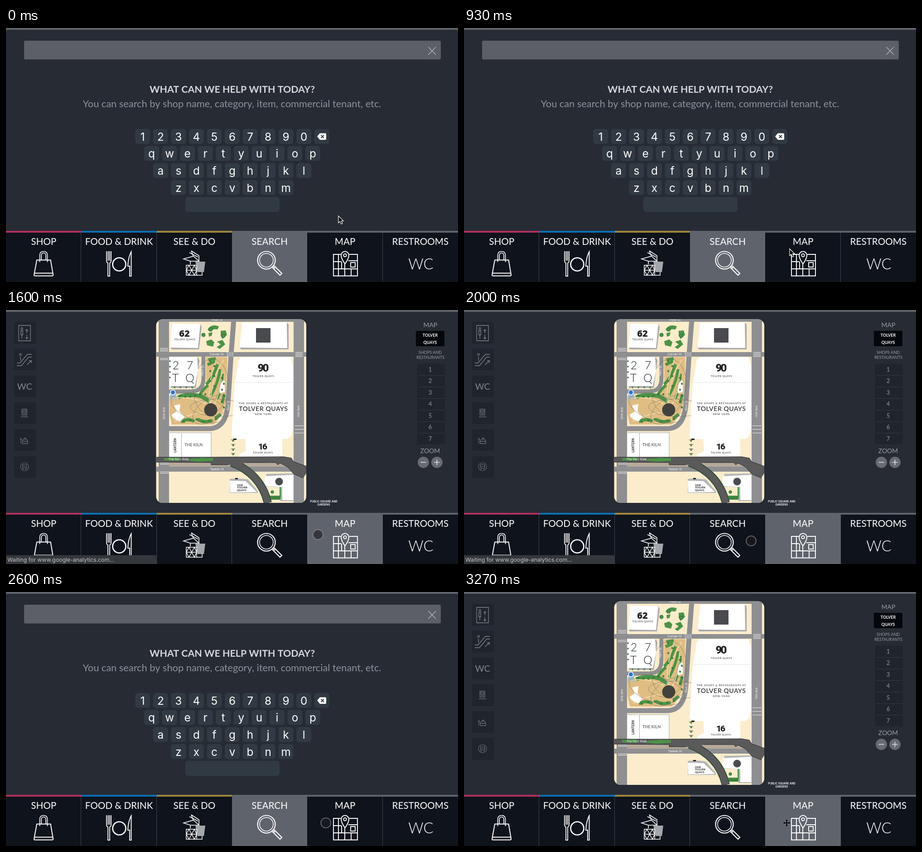
Recreate the animation shown at these times as an HTML page with a canvas. Size 998 px wide and 561 px high, loop 3340 ms.

```html
<!DOCTYPE html>
<html lang="en">
<head>
<meta charset="utf-8">
<title>Directory kiosk</title>
<style>
html, body { margin: 0; width: 100%; height: 100%; overflow: hidden; background: #262b34; }
canvas { display: block; width: 998px; height: 561px; }
</style>
</head>
<body>
<canvas id="stage" width="998" height="561"></canvas>
<script>
const ctx = document.getElementById('stage').getContext('2d');
const W = 998, H = 561, LOOP = 3340, TAB = 998 / 6;
const BG = '#262b34', GREY = '#5f636c', TABBG = '#0e131c', ROAD = '#8f8f91',
      GREEN = '#4b9447', DARK = '#5a5a5b', WHITE = '#fff', INK = '#222326';
const LATO = 'Lato, sans-serif', INTER = 'Inter, sans-serif';

// Switch times of the pages; text arrives a little after each page.
const pages = [
  { at: 0, map: false, text: 0 },
  { at: 1200, map: true, text: 1400 },
  { at: 2130, map: false, text: 2200 },
  { at: 2730, map: true, text: 2930 }
];
// Pointer path: time, x, y
const track = [[0, 734, 415], [130, 734, 415], [800, 719, 487], [1130, 719, 488.5], [1400, 719, 488.5],
  [1900, 634, 510], [2000, 634, 510], [2250, 638, 510], [2330, 638, 510], [2660, 712.5, 510], [LOOP, 712.5, 510]];

const clamp = v => Math.max(0, Math.min(1, v));
const ease = v => v * v * (3 - 2 * v);

function rect(x, y, w, h, color, r = 0) {
  ctx.fillStyle = color;
  ctx.beginPath();
  ctx.roundRect(x, y, w, h, r);
  ctx.fill();
}
function fill(d, color) {
  ctx.fillStyle = color;
  ctx.fill(new Path2D(d));
}
function line(d, color = WHITE, width = 2) {
  ctx.strokeStyle = color;
  ctx.lineWidth = width;
  ctx.stroke(new Path2D(d));
}
function disc(x, y, r, color, stroke, width = 1) {
  ctx.beginPath();
  ctx.arc(x, y, r, 0, 7);
  if (color) { ctx.fillStyle = color; ctx.fill(); }
  if (stroke) { ctx.strokeStyle = stroke; ctx.lineWidth = width; ctx.stroke(); }
}
// y is the middle of the capitals
function text(s, x, y, size, color, o = {}) {
  ctx.save();
  ctx.translate(x, y);
  if (o.turn) ctx.rotate(o.turn);
  ctx.font = `${o.weight || 400} ${size}px ${o.font || LATO}`;
  ctx.textAlign = o.align || 'center';
  ctx.letterSpacing = (o.gap || 0) + 'px';
  ctx.fillStyle = color;
  ctx.fillText(s, (o.gap || 0) / 2, size * 0.362);
  ctx.restore();
}

// ---- bottom tabs ----
const icons = [
  () => {
    line('M68 512.500H98.500L104 545Q104 547.500 102 547.500H64Q61.500 547.500 62 545ZM63 541.500H103');
    line('M74.500 517V502Q74.500 493.500 83 493.500T91.500 502V517M78 512V503Q78 497 83 497T88 503V512', WHITE, 1.7);
  },
  () => {
    line('M222 493V513Q222 518 225 519V548H229V519Q232 518 232 513V493M225.500 493V514M228.700 493V514', WHITE, 1.8);
    disc(250, 522, 14.5, null, WHITE, 2.6);
    line('M276.500 548V494Q270 506 269 526H273V548Z', WHITE, 1.9);
  },
  () => {
    line('M392 510L414 504L426 515H407ZM405 496L424 506M409 492L426 503V515M409 492L414 505M407 515V522', WHITE, 1.6);
    fill('M418 516H440L437 539H423Z', '#a4a7ab');
    line('M398 524H421V546H398ZM398 535H421M398 535L404 524L410 535L416 524L421 535M398 535L404 546L410 535L416 546L421 535', WHITE, 1.5);
    line('M421 546H433V539', WHITE, 1.5);
  },
  () => {
    disc(575, 513, 19.500, null, WHITE, 2.2);
    disc(575, 513, 15, null, WHITE, 1.5);
    line('M588 529L605 546L609 542L592 525M590 527L594 531', WHITE, 2.2);
  },
  () => {
    line('M739 500H723V547.500H776V500H758M723 516H740M756 514H776M723 532H776M734 500V547M748 521V547M762 532V547M741 516V532M761 518H771V528H761Z', WHITE, 1.9);
    line('M748.500 521Q740 509 740 502A8.500 8.500 0 0 1 757 502Q757 509 748.500 521Z');
    disc(748.5, 502, 3.2, null, WHITE, 1.8);
  },
  () => text('WC', 916, 521, 33, WHITE, { weight: 300 })
];
const labels = ['SHOP', 'FOOD & DRINK', 'SEE & DO', 'SEARCH', 'MAP', 'RESTROOMS'];
const strips = ['#b0305c', '#0b70b3', '#a1873a', GREY, GREY, GREY];

function drawTabs(active, ready) {
  for (let i = 0; i < 6; i++) {
    const x = Math.round(i * TAB), end = Math.round((i + 1) * TAB);
    rect(x, 451, end - x, 110, i === active ? GREY : TABBG);
    rect(x, 448, end - x, 4, strips[i]);
    if (i && i !== active && i - 1 !== active) rect(x - 1, 452, 1, 109, '#42464d');
    if (ready) text(labels[i], (i + 0.5) * TAB, 471.5, 20.7, WHITE);
    ctx.save();
    if (!ready) ctx.translate(0, -5);
    icons[i]();
    ctx.restore();
  }
}

// ---- search page ----
function drawSearch(ready) {
  rect(40, 28, 920, 41.5, '#5c5f67', 3);
  line('M932.500 42L949 59M949 42L932.500 59', '#b9bbbf', 1.2);
  if (ready) {
    text('WHAT CAN WE HELP WITH TODAY?', 499.5, 135, 21.4, '#d7d9dc', { weight: 700 });
    text('You can search by shop name, category, item, commercial tenant, etc.', 499, 167, 21.8, '#8e929a');
  }
  ['1234567890<', 'qwertyuiop', 'asdfghjkl', 'zxcvbnm'].forEach((row, r) => {
    const y = 239.5 + r * 37.6;
    [...row].forEach((c, i) => {
      const x = 499.5 + (i - (row.length - 1) / 2) * 39.55;
      rect(x - 16.5, y - 16.5, 33, 33, '#313a42', 6);
      if (c !== '<') text(c, x, y + 0.5, 24.3, WHITE, { font: INTER });
    });
  });
  fill('M687 239.500L693 232.500H705Q707 232.500 707 234.500V245Q707 247 705 247H693Z', WHITE);
  line('M695.500 236.500L702 243M702 236.500L695.500 243', '#313a42', 1.8);
  rect(396, 373, 208, 33, '#313a42', 6);
}

// ---- map page ----
const label = (s, x, y, size, gap = 0.6) => text(s, x, y, size, INK, { gap });
const street = (s, x, y, turn) => text(s, x, y, 6.6, WHITE, { font: INTER, turn });

function tree(x, y, r = 3) { disc(x, y, r, GREEN, '#24602f', 0.9); }
function stripes(x, y, w, n, step = 3) {
  for (let i = 0; i < n; i++) rect(x, y + i * step, w, 1.3, '#dededf');
}

function drawPark() {
  fill('M442 104H489L485 200Q482 232 458 253H366L361 230V190H412Q440 184 442 160Z', '#e0bd82');
  // planted beds fan out from the plaza
  line('M447 110L463 107M445 121L462 113M442 164Q456 152 467 120M428 187Q434 176 446 166', GREEN, 6.5);
  line('M452 189Q466 168 473 131M466 196Q475 182 478 141M477 206L482 186', GREEN, 6);
  line('M380 193Q404 183 432 191L450 202', GREEN, 9);
  line('M386 247Q402 238 416 246M423 241Q436 250 456 244M462 240L474 230', GREEN, 7);
  line('M452 220Q449 155 481 110M449 205Q446 160 464 111M441 207Q408 188 365 196M452 220Q477 185 476 133M438 227Q410 227 372 246', '#f4dfb0', 1.6);
  fill('M371 211L385 208L383 224L394 235L386 246Q368 242 366 231L377 224Z', WHITE);
  fill('M479 155L483 157V181L472 184Q470 168 479 155Z', WHITE);
  ctx.strokeStyle = '#777165';
  ctx.lineWidth = 0.7;
  [[452, 169, 39, 61, 0.08], [426, 216, 64, 29, 0.3], [452, 220, 45, 24, -0.6], [469, 216, 62, 19, 0.03]].forEach(e => {
    ctx.beginPath();
    ctx.ellipse(...e, 0, 7);
    ctx.stroke();
  });
  for (let i = 0; i < 6; i++) {
    tree(451 + i % 2 * 9, 113 + i * 11, 1.8);
    tree(385 + i * 11, 189 + Math.sin(i) * 3, 1.8);
    tree(477 + i % 2 * 4, 150 + i * 13, 1.8);
    tree(393 + i * 14, 247 - i % 3 * 3, 1.8);
  }
  disc(452, 220.5, 14.5, '#42413e');
}

function drawMap() {
  ctx.save();
  ctx.beginPath();
  ctx.roundRect(331.5, 20.5, 331.5, 405.5, 14);
  ctx.clip();
  rect(331, 20, 332, 406, '#fbeccb');

  rect(337, 20, 23, 406, ROAD);
  rect(635, 20, 23, 406, ROAD);
  rect(331, 20, 332, 6, ROAD);
  rect(331, 93, 332, 10, ROAD);
  rect(360, 336, 275, 11, '#b7a999');
  rect(331, 346, 332, 11, ROAD);
  line('M503 20L497 98L490 207Q486 262 448 262H358', ROAD, 11);
  line('M436 98V151Q436 180 408 180H358', ROAD, 9);
  stripes(340, 84, 18, 3);
  stripes(340, 106, 18, 2);
  stripes(340, 337, 20, 2);
  stripes(340, 357, 20, 2);
  stripes(637, 255, 20, 3, 8);
  stripes(639, 93, 16, 4);
  for (let i = 0; i < 4; i++) rect(488 + i * 4, 93, 1.2, 10, '#dededf');

  // gardens by the top
  fill('M445 43Q453 30 470 36L467 43Q455 41 450 48ZM474 46L485 45L488 55L478 64L474 57ZM442 69L453 65L460 71L457 81L444 78ZM466 70L478 66L484 76L472 86L465 82L474 76ZM447 51L456 49L454 57L448 59Z', GREEN);
  tree(436, 55, 4);
  tree(452, 43, 4);
  tree(480, 57, 4);
  drawPark();

  // buildings, shaded side first
  fill('M429 31L432 38L426 87H366L363 82Z M620 28L624 32V87H519L516 82Z M424 104L427 112L419 172H364V166Z', '#aaaaac');
  fill('M367 30L429 31L424 84L363 83Z M521 28L620 27L621 84L516 83Z M361 104H422L424 134L417 168H361Z', WHITE);
  fill('M514 110L520 104L628 104L634 124V259L630 279L621 285H509L498 279L505 160Z', WHITE);
  line('M506 160H633', '#dededf', 0.8);
  fill('M528 284H610V326H514L515 319L530 311Z M361 271H453V326H361Z', WHITE);
  line('M453 270V326M387.500 272V326M361 271H453', '#a4a4a6', 1);
  fill('M494 373L511 372L534 374L556 400V404H494Z', '#b5b5b8');
  fill('M494 377L529 378L554 402L495 403Z', WHITE);
  fill('M570 390L575 362L634 361V422H606V391Z', '#b5b5b8');
  fill('M572 367L634 364V420H610V391L570 389Z', WHITE);
  fill('M583 410H606V419H583Z M604 391H607V414H604Z', GREEN);
  for (let i = 0; i < 4; i++) {
    tree(588 + i * 5, 415, 2.3);
    rect(497, 286 + i * 10, 9, 1.6, '#6d7b6a');
    tree(501.5, 289 + i * 10, 1.5);
    tree(362, 113 + i * 12, 1.3);
    tree(372 + i * 13, 171, 1.3);
  }
  tree(588, 402, 3.2);
  rect(502, 284, 7, 3, INK);
  rect(506, 371, 6, 3, INK);

  // raised walk
  const branch = 'M498 337Q563 362 578 426';
  line(branch, '#2d7d3b', 18);
  line(branch, INK, 16.5);
  line(branch, DARK, 15);
  fill('M331 325H453L612 324L630 327L635 335L663 345V361L656 371L635 362L622 347L605 338L600 342L596 337H528L520 342H453V337L331 336Z', DARK);
  line('M331 325H453L612 324L630 327L635 335L663 345M331 336L453 337V342H490M528 337H596L600 342L605 338L622 347L635 362L656 371', '#29292b', 1);
  fill('M348 327L382 326V333L350 332ZM398 332L410 328L457 327V333L425 335ZM429 326L444 327L439 333L428 332Z', GREEN);

  // street names
  street('Pellin St', 466, 22);
  street('Corvan St', 465, 98);
  street('Tasken St', 466, 352);
  street('Orle Ave', 348.5, 228, -Math.PI / 2);
  street('Vint Ave', 646, 224, -Math.PI / 2);
  street('Harn St', 433.5, 134, -1.5);
  street('Kest St', 490.5, 211, -1.5);
  street('The Fern Walk', 381, 330);

  // building names
  text('62', 394, 52, 20, INK, { weight: 800, font: '"Open Sans", sans-serif' });
  label('TOLVER QUAYS', 394.5, 65, 5.5);
  rect(552, 40, 32, 32, '#4a4b4e');
  [['2', 375, 122], ['7', 406, 122], ['T', 374, 150], ['Q', 406, 150]].forEach(([c, x, y]) =>
    text(c, x, y, 25, INK, { weight: 300 }));
  text('90', 568, 127, 24, INK, { weight: 800, font: 'Roboto, sans-serif', gap: -3 });
  label('TOLVER QUAYS', 568, 146, 5.6);
  label('THE SHOPS & RESTAURANTS AT', 568, 206, 6, 0.75);
  text('TOLVER QUAYS', 568, 218, 14, INK, { gap: 0.6, weight: 500 });
  label('NEW YORK', 568, 230, 6, 0.8);
  text('16', 567, 301, 19, INK, { weight: 800, font: 'Roboto, sans-serif', gap: -2 });
  label('TOLVER QUAYS', 567, 315, 5.2);
  text('LANTERN', 374, 299, 6.5, INK, { weight: 700, turn: -Math.PI / 2, gap: 0.3 });
  text('THE KILN', 414, 298, 9, '#6f7073', { weight: 700 });
  ['ONE', 'TOLVER', 'QUAYS'].forEach((s, i) =>
    text(s, 510, 386.5 + i * 5.6, 6.2, INK, { weight: 700, align: 'left' }));
  disc(603, 379, 8.5, '#4a4b4e');

  // you are here
  const beam = ctx.createLinearGradient(0, 182, 0, 202);
  beam.addColorStop(0, '#5b9fe6');
  beam.addColorStop(1, 'rgba(120,175,230,0)');
  fill('M364 182H373L379 201H360Z', beam);
  disc(368.5, 182, 5.3, '#2a71dc', WHITE, 1.6);
  ctx.restore();
}

function drawServices() {
  const a = '#81858c', b = '#666a71';
  for (let i = 0; i < 6; i++) rect(18, 26 + i * 59.3, 48, 48, '#20242c');
  line('M28 34H54V68H28ZM33 45V55H37V45ZM35 55V63M46 43V51M43.500 46L46 43L48.500 46M46 55V64M43.500 61L46 64L48.500 61', a, 1.3);
  disc(35, 40.5, 2, null, a, 1.2);
  line('M24 117H31L47 98H57M24 123H34L50 104H57M32 103V112M46 121L56 112M51 112H56V117', a, 1.3);
  disc(32, 98, 2, null, a, 1.2);
  text('WC', 41, 169, 19.5, a);
  line('M35 219H46V232H35ZM37 222H44V226H37ZM37 229H44M33 236H49', b, 1.4);
  line('M33 282V295M31 286H35M36 295V290L39 285H45L48 290V295ZM36 290H48M40 283H44', b, 1.3);
  disc(41, 346, 9, null, b, 1.2);
  line('M36.500 341H45.500V349H36.500ZM36.500 345H45.500M37 353L39 349M45 353L43 349', b, 1.2);
}

function drawLevels(ready) {
  const top = ready ? 118.5 : 112, zoomY = ready ? 336.5 : 327.5;
  rect(908, top, 61, 178, '#20242c');
  for (let i = 0; i < 7; i++) {
    const y = top + 25.5 * i;
    if (i) rect(910, y, 58, 1, '#353942');
    if (ready) text(i + 1, 936.5, y + 12.5, 12.5, '#9a9da3');
  }
  rect(905, ready ? 46 : 44, 63, ready ? 34 : 33, '#04070b', 2);
  if (ready) {
    text('MAP', 937, 33, 14, '#9a9da3');
    text('TOLVER', 936.5, 55.5, 9, WHITE, { weight: 700 });
    text('QUAYS', 936.5, 71.5, 9, WHITE, { weight: 700 });
    text('SHOPS AND', 936.5, 93.5, 9, '#9a9da3');
    text('RESTAURANTS', 937, 105, 9, '#9a9da3');
    text('ZOOM', 936.5, 310.5, 14, '#9a9da3');
    text('PUBLIC SQUARE AND', 701.5, 422.5, 5.8, WHITE, { weight: 600, font: INTER });
    text('GARDENS', 701.5, 430, 5.8, WHITE, { weight: 600, font: INTER });
  }
  disc(921.5, zoomY, 12.5, '#686b73');
  disc(951.5, zoomY, 12.5, '#686b73');
  line(`M915.500 ${zoomY}H927.500M945.500 ${zoomY}H957.500M951.500 ${zoomY - 6}V${zoomY + 6}`, '#e4e5e7', 1.6);
}

// ---- overlays ----
function drawStatus(t) {
  const shown = t < 2500 ? t >= 1200 && 1 - clamp((t - 2200) / 100)
                         : t >= 2730 && 1 - clamp((t - 3060) / 100);
  if (!shown) return;
  ctx.save();
  ctx.globalAlpha = shown;
  rect(0, 541.5, 332, 20, '#34373c', [0, 4, 0, 0]);
  text('Waiting for www.google-analytics.com...', 3, 551.5, 12.3, '#c4c5c7', { font: INTER, align: 'left' });
  ctx.restore();
}

function drawPointer(t) {
  let i = 1;
  while (i < track.length - 1 && track[i][0] <= t) i++;
  const [t0, x0, y0] = track[i - 1], [t1, x1, y1] = track[i];
  const p = ease(clamp((t - t0) / (t1 - t0)));
  ctx.save();
  ctx.translate(x0 + (x1 - x0) * p, y0 + (y1 - y0) * p);
  if (t < 1130) {
    const arrow = 'M0 0V15.500L3.600 12.200L6.200 18L9 16.700L6.500 11.200H11Z';
    fill(arrow, '#050505');
    line(arrow, WHITE, 1.2);
  } else if (t < 3130) {
    disc(0, 0, 11, 'rgba(28,28,30,.62)', 'rgba(150,152,156,.7)', 1.6);
  } else {
    const arm = 'M0 -8L3.500 -4.200H1.300V-1.300H4.200V-3.500L8 0L4.200 3.500V1.300H1.300V4.200H3.500L0 8L-3.500 4.200H-1.300V1.300H-4.200V3.500L-8 0L-4.200 -3.500V-1.300H-1.300V-4.200H-3.500Z';
    line(arm, '#b9bbbf', 1);
    fill(arm, '#08090b');
  }
  ctx.restore();
}

function draw(t) {
  const page = pages.filter(p => p.at <= t).pop();
  const ready = t >= page.text;
  rect(0, 0, W, H, BG);
  rect(0, 0, W, 4, GREY);
  if (page.map) {
    drawServices();
    drawMap();
    drawLevels(ready);
  } else {
    drawSearch(ready);
  }
  drawTabs(page.map ? 4 : 3, ready);
  drawStatus(t);
  drawPointer(t);
}

const start = performance.now();
function tick() {
  draw((performance.now() - start) % LOOP);
  requestAnimationFrame(tick);
}
tick();
</script>
</body>
</html>
```
